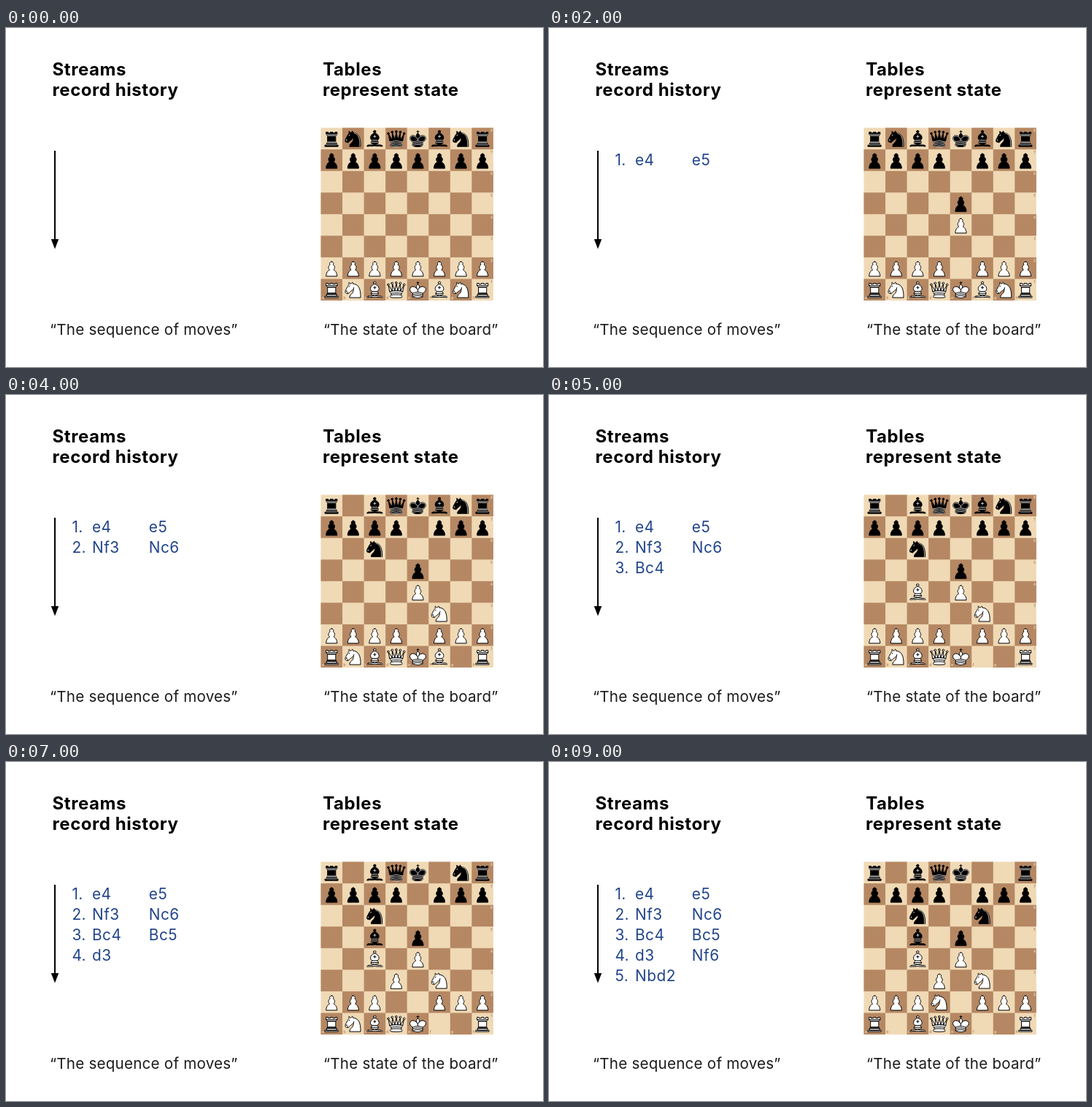
Write an HTML page that moves like this. It is 736x464 px and loops after 10000 ms.

```html
<!DOCTYPE html>
<html lang="en">
<head>
<meta charset="utf-8">
<title>Streams and tables</title>
<style>
  html, body { margin: 0; width: 100%; height: 100%; overflow: hidden; background: #fff; }
  svg { display: block; width: 736px; height: 464px; }
  text { font-family: Inter, "Open Sans", sans-serif; }
  .title { font-size: 24px; font-weight: 650; letter-spacing: .55px; }
  .caption { font-size: 20.6px; letter-spacing: .22px; fill: #1c1c1c; }
  .move { font-size: 20.8px; letter-spacing: .5px; fill: #21448a; }
  .label { font: 600 5.2px "Noto Sans", sans-serif; opacity: .85; }
  .piece { stroke: #000; stroke-width: 1.5; stroke-linecap: round; stroke-linejoin: round; }
  .white { fill: #fff; }
  .black { fill: #000; }
  .detail { fill: none; }
  .black .detail { stroke: #ececec; stroke-width: 1.2; }
  .white .dot { fill: #000; }
  .black .dot { fill: #ececec; stroke: #ececec; }
</style>
</head>
<body>
<svg id="stage" viewBox="0 0 736 464">
  <text class="title" x="63.6" y="65">Streams</text>
  <text class="title" x="63.6" y="93">record history</text>
  <text class="title" x="434.3" y="65">Tables</text>
  <text class="title" x="434" y="93">represent state</text>
  <path d="M67 168V291" stroke="#000" stroke-width="2"/>
  <path d="M61.8 289h10.4L67 302.5z"/>
  <text class="caption" x="60" y="419.5">“The sequence of moves”</text>
  <text class="caption" x="435" y="419.5">“The state of the board”</text>
  <g id="score"></g>
  <g id="board" transform="translate(431.5 136.6)"></g>
</svg>
<script>
const CELL = 29.55, STEP = 1000, STEPS = 10;
const LIGHT = '#f0d9b5', DARK = '#b58863', FILES = 'abcdefgh';
const board = document.getElementById('board');
const score = document.getElementById('score');

// Piece outlines on a 45-unit square.
const rook = 'M9 39h27v-3H9zM12 36v-4h21v4zM12.5 32l1.5-2.5h17l1.5 2.5zM14 29.5V17h17v12.5zM14 17l-3-3V9h4v2h5V9h5v2h5V9h4v5l-3 3z';
const crownBase = 'M9 26c0 2 1.5 2 2.5 4 1 1.5 1 1 .5 3.5-1.5 1-1.5 2.5-1.5 2.5-1.5 1.5.5 2.5.5 2.5 6.5 1 16.5 1 23 0 0 0 1.5-1 0-2.5 0 0 .5-1.5-1-2.5-.5-2.5-.5-2 .5-3.5 1-2 2.5-2 2.5-4-8.5-1.5-18.5-1.5-27 0z';
const kingBands = 'M11.5 30c5.5-3 15.5-3 21 0m-21 3.5c5.5-3 15.5-3 21 0m-21 3.5c5.5-3 15.5-3 21 0';
const jewel = ([x, y]) => `M${x - 2} ${y}a2 2 0 1 1 4 0a2 2 0 1 1-4 0z`;

const SHAPES = {
  P: { body: ['M22.5 9c-2.2 0-4 1.8-4 4 0 .9.3 1.7.8 2.4C17.3 16.5 16 18.6 16 21c0 2 .9 3.8 2.4 5-3 1.1-7.4 5.6-7.4 13.5h23c0-7.9-4.4-12.4-7.4-13.5 1.5-1.2 2.4-3 2.4-5 0-2.4-1.3-4.5-3.3-5.6.5-.7.8-1.5.8-2.4 0-2.2-1.8-4-4-4z'] },
  N: {
    body: ['M22 10c10.5 1 16.5 8 16 29H15c0-9 10-6.5 8-21',
      'M24 18c.4 2.9-5.5 7.4-8 9-3 2-2.8 4.3-5 4-1-.9 1.4-3 0-3-1 0 .2 1.2-1 2-1 0-4 1-4-4 0-2 6-12 6-12s1.9-1.9 2-3.5c-.7-1-.5-2-.5-3 1-1 3 2.5 3 2.5h2s.8-2 2.5-3c1 0 1 3 1 3'],
    dot: 'M8.5 25.5a.5.5 0 1 1 1 0a.5.5 0 1 1-1 0zM14.1 16.2l.8-1.4',
    black: 'M25 11.2c7.5 1.6 12.3 9 11.4 27.5'
  },
  B: {
    body: ['M9 36c3.4-1 10.1.4 13.5-2 3.4 2.4 10.1 1 13.5 2 0 0 1.7.5 3 2-.7 1-1.7 1-3 .5-3.4-1-10.1.5-13.5-1-3.4 1.5-10.1 0-13.5 1-1.4.5-2.3.5-3-.5 1.4-1.9 3-2 3-2z',
      'M15 32c2.5 2.5 12.5 2.5 15 0 .5-1.5 0-2 0-2 0-2.5-2.5-4-2.5-4 5.5-1.5 6-11.5-5-15.5-11 4-10.5 14-5 15.5 0 0-2.5 1.5-2.5 4 0 0-.5.5 0 2z',
      'M20 8a2.5 2.5 0 1 1 5 0a2.5 2.5 0 1 1-5 0z'],
    detail: 'M17.5 26h10M15 30h15M22.5 15.5v5M20 18h5'
  },
  R: { body: [rook], black: 'M12 35.5h21M13 31.5h19M14 29.5h17M14 16.5h17M11 14h23', white: 'M11 14h23' },
  Q: {
    body: ['M9 26c8.5-1.5 21-1.5 27 0l2.5-12.5L31 25l-.3-14.1-5.2 13.6-3-14.5-3 14.5-5.2-13.6L14 25 6.5 13.5z', crownBase,
      [[6, 12], [14, 9], [22.5, 8], [31, 9], [39, 12]].map(jewel).join('')],
    white: 'M11.5 30c3.5-1 18.5-1 22 0M12 33.5c6-1 15-1 21 0',
    black: 'M11 29a35 35 0 0 1 23 0M12.5 31.5h20M11.5 34.5a35 35 0 0 0 22 0M10.5 37.5a35 35 0 0 0 24 0'
  },
  K: {
    body: ['M22.5 11.6V6M20 8h5', 'M22.5 25s4.5-7.5 3-10.5c0 0-1-2.5-3-2.5s-3 2.5-3 2.5c-1.5 3 3 10.5 3 10.5',
      'M11.5 37c5.5 3.5 15.5 3.5 21 0v-7s9-4.5 6-10.5c-4-6.5-13.5-3.5-16 4V27v-3.5c-3.5-7.5-13-10.5-16-4-3 6 5 10 5 10z'],
    white: kingBands,
    black: 'M32 29.5s8.5-4 6-9.7C34.2 14 25 18 22.5 24.5v2-2C20 18 9.9 14 7 19.8c-2.5 5.7 4.9 9 4.9 9' + kingBands
  }
};

// [notation, from, to]
const MOVES = [
  ['e4', 'e2', 'e4'], ['e5', 'e7', 'e5'],
  ['Nf3', 'g1', 'f3'], ['Nc6', 'b8', 'c6'],
  ['Bc4', 'f1', 'c4'], ['Bc5', 'f8', 'c5'],
  ['d3', 'd2', 'd3'], ['Nf6', 'g8', 'f6'],
  ['Nbd2', 'b1', 'd2']
];

function add(parent, tag, attrs, text) {
  const node = document.createElementNS('http://www.w3.org/2000/svg', tag);
  for (const key in attrs) node.setAttribute(key, attrs[key]);
  if (text) node.textContent = text;
  return parent.appendChild(node);
}

function drawSquares() {
  add(board, 'rect', { width: CELL * 8, height: CELL * 8, fill: LIGHT });
  for (let row = 0; row < 8; row++)
    for (let col = 1 - row % 2; col < 8; col += 2)
      add(board, 'rect', { x: col * CELL, y: row * CELL, width: CELL, height: CELL, fill: DARK });
  for (let i = 0; i < 8; i++) {
    const fill = i % 2 ? DARK : LIGHT;
    add(board, 'text', { class: 'label', x: CELL * 8 - 1, y: i * CELL + 5.8, 'text-anchor': 'end', fill }, String(8 - i));
    add(board, 'text', { class: 'label', x: i * CELL + 1.2, y: CELL * 8 - 1.5, fill }, FILES[i]);
  }
}

function place(piece, square) {
  const x = FILES.indexOf(square[0]) * CELL, y = (8 - square[1]) * CELL;
  piece.setAttribute('transform', `translate(${x} ${y}) scale(${CELL / 45})`);
}

function makePiece(kind, side, square) {
  const shape = SHAPES[kind];
  const piece = add(board, 'g', { class: 'piece ' + side });
  shape.body.forEach(d => add(piece, 'path', { d }));
  const detail = (shape.detail || '') + (shape[side] || '');
  if (detail) add(piece, 'path', { class: 'detail', d: detail });
  if (shape.dot) add(piece, 'path', { class: 'dot', d: shape.dot });
  place(piece, square);
  return piece;
}

drawSquares();
const pieces = {};
[...'RNBQKBNR'].forEach((kind, i) => {
  for (const [k, side, rank] of [[kind, 'black', 8], ['P', 'black', 7], ['P', 'white', 2], [kind, 'white', 1]]) {
    const square = FILES[i] + rank;
    pieces[square] = makePiece(k, side, square);
  }
});

const entries = MOVES.map(([name], i) => {
  const turn = i >> 1, y = 188 + turn * 28;
  const entry = add(score, 'g', {});
  if (i % 2 === 0) add(entry, 'text', { class: 'move', x: 90.4, y }, `${turn + 1}.`);
  add(entry, 'text', { class: 'move', x: i % 2 ? 195.8 : 118, y }, name);
  return entry;
});

let shown = -1;
function show(count) {
  if (count === shown) return;
  shown = count;
  MOVES.forEach(([, from, to], i) => {
    const played = i < count;
    place(pieces[from], played ? to : from);
    entries[i].setAttribute('visibility', played ? 'visible' : 'hidden');
  });
}

const start = performance.now();
function tick() {
  show(Math.floor((performance.now() - start) / STEP) % STEPS);
  requestAnimationFrame(tick);
}
tick();
</script>
</body>
</html>
```
